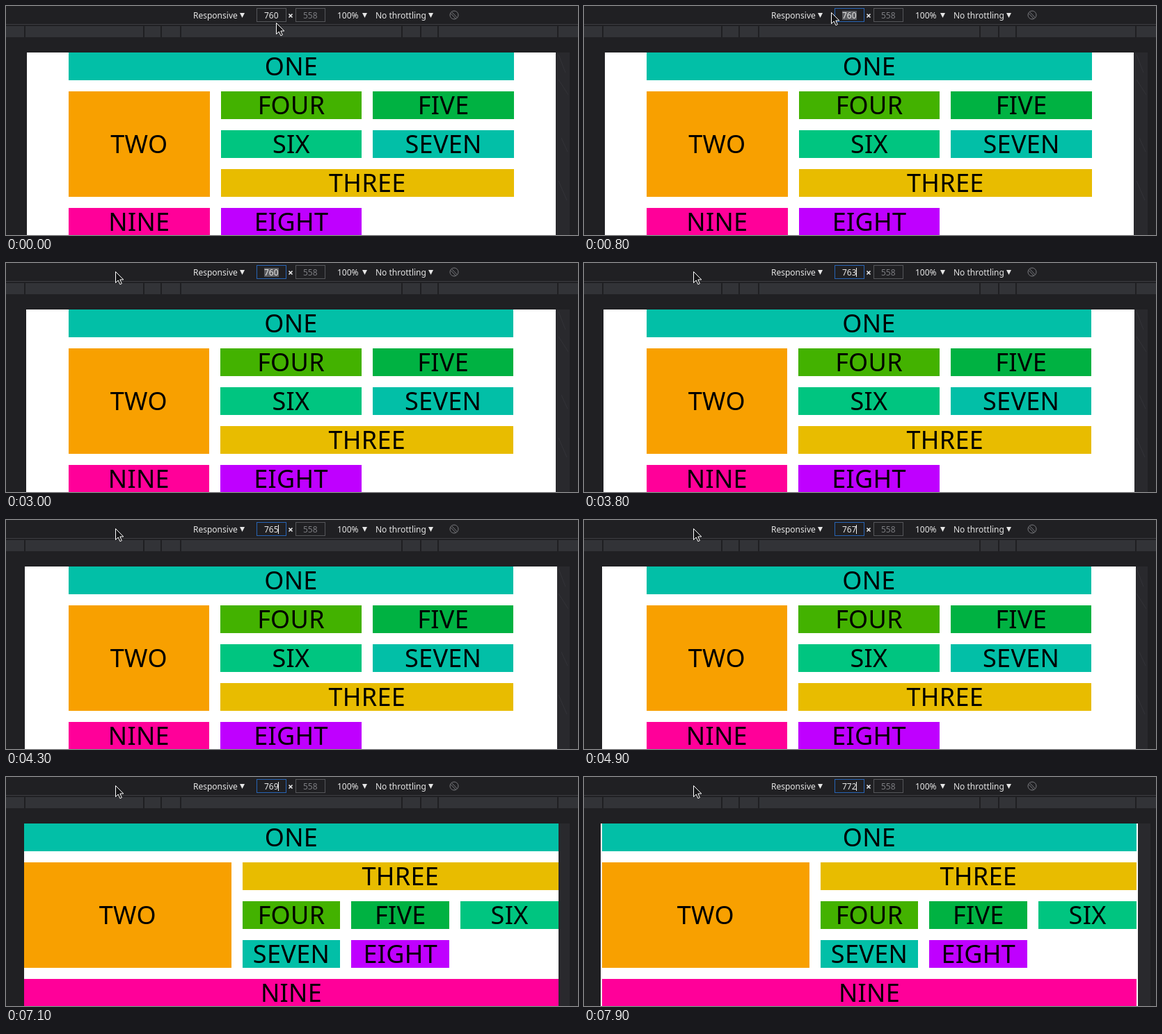
These frames come from a looping animation (822 by 330 pixels, 8000 ms). An HTML page:

```html
<!DOCTYPE html>
<html lang="en">
<head>
<meta charset="utf-8">
<title>Responsive grid</title>
<style>
  html, body { margin: 0; width: 100%; height: 100%; overflow: hidden; background: #202023; }
  svg { display: block; width: 822px; height: 330px; font-family: "Noto Sans", "Open Sans", sans-serif; }
  .bar { font-size: 12px; fill: #e6e6e6; }
  .tile { font-size: 36px; letter-spacing: .3px; text-anchor: middle; fill: #000; }
</style>
</head>
<body>
<svg id="stage" viewBox="0 0 822 330"></svg>
<script>
const LOOP = 8000;
const stage = document.getElementById('stage');

function add(tag, attrs, text) {
  const el = document.createElementNS('http://www.w3.org/2000/svg', tag);
  set(el, attrs);
  if (text) el.textContent = text;
  stage.appendChild(el);
  return el;
}
function set(el, attrs) {
  for (const k in attrs) el.setAttribute(k, attrs[k]);
}
const rect = (x, y, width, height, fill) => add('rect', { x, y, width, height, fill });
const label = (x, text) => add('text', { x, y: 18, class: 'bar' }, text);
const path = (d, attrs) => add('path', { d, ...attrs });
const show = (el, on) => set(el, { visibility: on ? 'visible' : 'hidden' });

// Toolbar and media query bar
rect(0, 0, 822, 26, '#202023');
rect(0, 26, 822, 1, '#3d3d41');
rect(0, 29, 822, 16, '#323337');
for (const x of [26, 197, 222, 250, 568, 595, 620, 792]) rect(x, 29, 2, 16, '#1f1f22');

label(269, 'Responsive');
label(476, '100%');
label(531, 'No throttling');
for (const x of [336, 512, 607]) path(`M${x} 10h7l-3.5 7z`, { fill: '#e6e6e6' });
path('M406.5 11.5l5 5m0-5l-5 5', { stroke: '#eee', 'stroke-width': 1.6 });

const field = x => add('rect', { x: x + .5, y: 3.5, width: 42, height: 19, fill: '#202023', stroke: '#55565a' });
const widthField = field(360);
field(416);
const selection = rect(371, 7, 21, 13, '#5b5c60');
const digits = label(371, '760');
set(label(427, '558'), { fill: '#7d7e82', style: 'fill:#7d7e82' });
const caret = rect(391, 7, 1, 13, '#f0f0f0');

// Rotate icon
add('circle', { cx: 644, cy: 13, r: 6, fill: 'none', stroke: '#77787c' });
path('M640.5 8.5l8 8.5m-9.5-6.5l7.5 8', { stroke: '#77787c', fill: 'none' });

// Page and resize handle
const handle = rect(790, 67, 20, 263, '#29292d');
const scratches = path('M794 70l10 26m-10 10l14 22m-14 124l12 28m-8-90l9 20', { stroke: '#333338', fill: 'none' });
const page = rect(30, 67, 760, 263, '#fff');

// Cells: [column, row, column span, row span]
const TILES = [
  ['ONE', '#02bfa7', [0, 0, 3, 1], [0, 0, 5, 1]],
  ['TWO', '#f8a000', [0, 1, 1, 3], [0, 1, 2, 3]],
  ['THREE', '#e8bc00', [1, 3, 2, 1], [2, 1, 3, 1]],
  ['FOUR', '#43b200', [1, 1, 1, 1], [2, 2, 1, 1]],
  ['FIVE', '#00b242', [2, 1, 1, 1], [3, 2, 1, 1]],
  ['SIX', '#00c580', [1, 2, 1, 1], [4, 2, 1, 1]],
  ['SEVEN', '#02bfa7', [2, 2, 1, 1], [2, 3, 1, 1]],
  ['EIGHT', '#bf00ff', [1, 4, 1, 1], [3, 3, 1, 1]],
  ['NINE', '#ff0099', [0, 4, 1, 1], [0, 4, 5, 1]]
].map(([name, color, narrow, wide]) => ({
  narrow, wide,
  box: rect(0, 0, 0, 0, color),
  text: add('text', { class: 'tile' }, name)
}));

const arrow = path('M.5 .5V16.5L4.2 13L6.9 18.8L9.4 17.6L6.8 12H11.8Z',
  { fill: '#151517', stroke: '#fff', 'stroke-linejoin': 'round' });
const beam = path('M-3 -8.5h2.5l.5 .5l.5 -.5h2.5M0 -8V8M-3 8.5h2.5l.5 -.5l.5 .5h2.5',
  { fill: 'none', stroke: '#f0f0f0' });

// [time, typed width, page width]
const STEPS = [
  [0, 760, 760], [3000, 760, 761], [3300, 762, 762], [3800, 763, 763],
  [3900, 764, 764], [4300, 765, 765], [4500, 766, 766], [4900, 767, 767],
  [5400, 768, 768], [7100, 769, 768], [7300, 770, 770], [7600, 771, 771],
  [7900, 772, 772]
];

function layout(width) {
  const GAP = 16;
  const left = 410 - Math.ceil(width / 2);
  const wide = width >= 768;
  const cols = wide ? 5 : 3;
  const inner = wide ? 768 : 640;
  const start = left + (width - inner) / 2;
  // Track widths are cut to 1/64 px before edges are snapped
  const track = Math.floor((inner - GAP * (cols - 1)) / cols * 64) / 64;

  set(page, { x: left, width });
  set(handle, { width: width >= 770 ? 24 : 20 });
  show(scratches, !wide);
  for (const t of TILES) {
    const [c, r, cs, rs] = wide ? t.wide : t.narrow;
    const a = start + c * (track + GAP);
    const b = a + cs * (track + GAP) - GAP;
    const x = Math.round(a), y = 67 + r * 56, height = rs * 56 - GAP;
    set(t.box, { x, y, width: Math.round(b) - x, height });
    set(t.text, { x: (a + b) / 2, y: y + height / 2 + 13 });
  }
}

function pointer(t) {
  if (t < 100) return [388, 24];
  if (t < 300) return [384, 12];
  if (t < 700) return [384, 9];
  const p = Math.min(1, (Math.floor(t / 100) - 6) / 9);
  const e = p * p * (3 - 2 * p);
  return [Math.round(384 - 227 * e), Math.round(9 + 3 * e)];
}

let current = null;
function draw(t) {
  const step = STEPS.filter(s => s[0] <= t).pop();
  if (step !== current) {
    current = step;
    digits.textContent = step[1];
    layout(step[2]);
  }
  set(widthField, { stroke: t < 300 ? '#55565a' : '#2864b4' });
  show(selection, t >= 500 && t < 3300);
  show(caret, t >= 3300 && (t < 5800 || t >= 6500));

  const [x, y] = pointer(t);
  const overField = t >= 100 && x > 360;
  show(arrow, !overField);
  show(beam, overField);
  set(overField ? beam : arrow, { transform: `translate(${x} ${y})` });
}

const begin = performance.now();
function tick() {
  draw((performance.now() - begin) % LOOP);
  requestAnimationFrame(tick);
}
tick();
</script>
</body>
</html>
```
